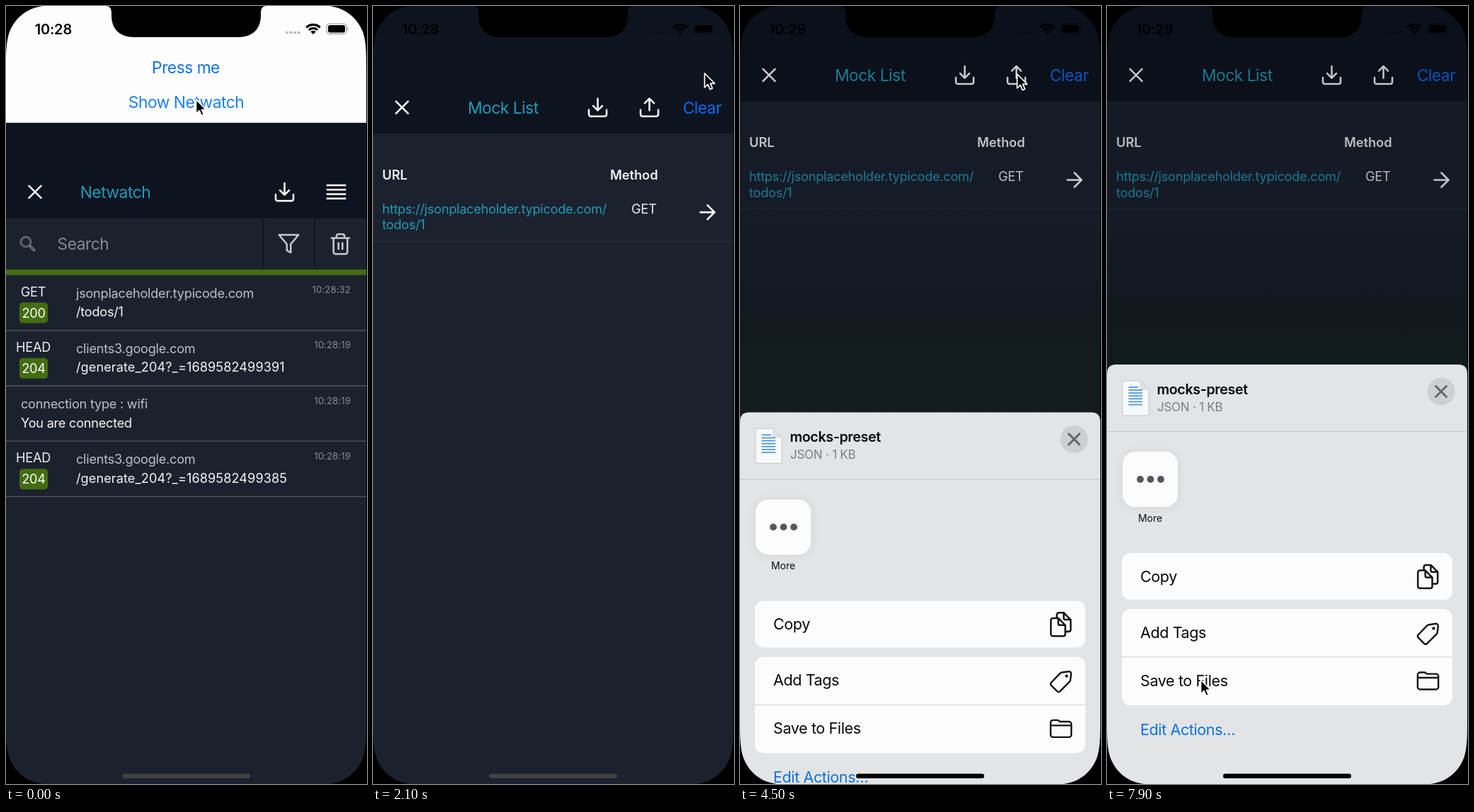
An HTML page for the animation above (8 s loop, 510 by 1098 pixels).

```html
<!DOCTYPE html>
<html lang="en">
<head>
<meta charset="utf-8">
<title>Network inspector</title>
<style>
  html, body { margin: 0; width: 100%; height: 100%; overflow: hidden; background: #000; }
  svg { display: block; width: 100vw; height: 100vh; }
  text { font-family: Inter, Roboto, sans-serif; white-space: pre; }
  .title { font-size: 22.8px; letter-spacing: -.5px; }
  .body { font-size: 18.2px; letter-spacing: -.27px; }
  .path { font-size: 18.2px; letter-spacing: .04px; }
  .head { font-size: 18.2px; font-weight: 600; }
  .time { font-size: 13.2px; letter-spacing: .1px; }
  .clock { font-size: 20px; font-weight: 600; letter-spacing: -.2px; }
  .action { font-size: 21.5px; letter-spacing: -.38px; }
  .file { font-size: 19.6px; font-weight: 600; letter-spacing: -.35px; }
  .meta { font-size: 17px; letter-spacing: -.25px; }
  .more { font-size: 14px; }
  .icon { fill: none; stroke-width: 1.8; stroke-linecap: round; stroke-linejoin: round; }
</style>
</head>
<body>
<svg id="stage" viewBox="0 0 510 1098" preserveAspectRatio="none"></svg>
<script>
const LOOP = 8000, STEP = 100, SCREEN_H = 1098, SHEET_TRAVEL = 600;
const CYAN = '#209bba', HEADER = '#0e141f', BODY = '#1b222e', GREEN = '#436d10', SOFT = '#bcc0c6';

const text = (x, y, cls, fill, str, anchor = 'start') =>
  `<text x="${x}" y="${y}" class="${cls}" fill="${fill}" text-anchor="${anchor}">${str}</text>`;
const rect = (x, y, w, h, fill, rx = 0) =>
  `<rect x="${x}" y="${y}" width="${w}" height="${h}" rx="${rx}" fill="${fill}"/>`;
const line = (x1, y1, x2, y2, color, width) =>
  `<path d="M${x1} ${y1}L${x2} ${y2}" stroke="${color}" stroke-width="${width}" fill="none"/>`;
const circle = (x, y, r, fill) => `<circle cx="${x}" cy="${y}" r="${r}" fill="${fill}"/>`;

// Icons are drawn on a 24-unit grid and centred on (x, y).
const SHAPES = {
  close: 'M5.8 5.8L18.2 18.2M18.2 5.8L5.8 18.2',
  download: 'M21 14.5V19a2 2 0 0 1-2 2H5a2 2 0 0 1-2-2v-4.5M7.3 10.3l4.7 4.7 4.7-4.7M12 15V3',
  upload: 'M21 14.5V19a2 2 0 0 1-2 2H5a2 2 0 0 1-2-2v-4.5M16.7 7.7L12 3 7.3 7.7M12 3v12',
  menu: 'M3 5.4h18M3 9.8h18M3 14.2h18M3 18.6h18',
  filter: 'M22 3H2l8 9.46V19l4 2v-8.54z',
  trash: 'M3 6h18M19 6v14a2 2 0 0 1-2 2H7a2 2 0 0 1-2-2V6M8 6V4a2 2 0 0 1 2-2h4a2 2 0 0 1 2 2v2M10 11v6M14 11v6',
  arrow: 'M5 12h14M12 5l7 7-7 7',
  copy: 'M8 6V2.5A2 2 0 0 1 10 .5H15L22 7.5V17.5A2 2 0 0 1 20 19.5H16.5M15 .5V6A1.5 1.5 0 0 0 16.5 7.5H22M4 6H9.5L16.5 13V22A2 2 0 0 1 14.5 24H4A2 2 0 0 1 2 22V8A2 2 0 0 1 4 6ZM9.5 6V11.5A1.5 1.5 0 0 0 11 13H16.5',
  tag: 'M13 2.5L20 1.5A2.4 2.4 0 0 1 22.6 4.2L21.8 10.5Q21.6 11.6 20.8 12.4L11 22.2Q9.5 23.5 8 22.2L1.8 16Q.5 14.5 1.8 13L11 3.5Q12 2.6 13 2.5ZM17.8 5.6a.7.7 0 1 0 .1 0',
  folder: 'M1 18.5V5.5A2.5 2.5 0 0 1 3.5 3H8Q9 3 9.8 3.8L10.8 4.6H20.5A2.5 2.5 0 0 1 23 7.1V18.5A2.5 2.5 0 0 1 20.5 21H3.5A2.5 2.5 0 0 1 1 18.5ZM1 8.6H23'
};
const icon = (name, x, y, scale, color = '#fff', id = '') =>
  `<path ${id && `id="${id}"`} class="icon" d="${SHAPES[name]}" stroke="${color}"
    transform="translate(${x} ${y}) scale(${scale}) translate(-12 -12)"/>`;

function requestRow(index, method, status, host, path, time) {
  const y = 214.7 + index * 78.2;
  const label = method
    ? text(38.5, y + 30, 'body', '#eceef0', method, 'middle') +
      rect(19, y + 39, 40, 29, GREEN, 4.5) +
      text(39, y + 60, 'body', '#fff', status, 'middle')
    : '';
  const x = method ? 99 : 21;
  return label + text(x, y + 32, 'body', SOFT, host) +
    text(x, y + 58.5, path.includes('_') ? 'path' : 'body', '#f4f5f6', path) +
    text(487, y + 25.5, 'time', '#878d95', time, 'end') +
    line(0, y + 78.2, 509, y + 78.2, '#515963', 1.3);
}

const panel = rect(0, 0, 510, 1110, BODY) + rect(0, 0, 510, 134.5, HEADER) + icon('close', 41, 97.5, 1.38);

const requests = panel +
  text(104.7, 106, 'title', CYAN, 'Netwatch') +
  icon('download', 393.5, 97.5, 1.39) + icon('menu', 466.5, 97.5, 1.42, '#fff', 'menuIcon') +
  line(363, 134, 363, 208, HEADER, 1.5) + line(436, 134, 436, 208, HEADER, 1.5) +
  `<circle cx="28" cy="168" r="7" fill="none" stroke="#606770" stroke-width="2.8"/>` +
  line(33, 173, 41, 181, '#606770', 4) +
  text(72.5, 179, 'title', '#848a93', 'Search') +
  icon('filter', 399.5, 170.5, 1.38, '#c6cacf') + icon('trash', 472.5, 171, 1.4, '#c6cacf') +
  rect(0, 207, 510, 7.8, GREEN) +
  requestRow(0, 'GET', '200', 'jsonplaceholder.typicode.com', '/todos/1', '10:28:32') +
  requestRow(1, 'HEAD', '204', 'clients3.google.com', '/generate_204?_=1689582499391', '10:28:19') +
  requestRow(2, '', '', 'connection type : wifi', 'You are connected', '10:28:19') +
  requestRow(3, 'HEAD', '204', 'clients3.google.com', '/generate_204?_=1689582499385', '10:28:19');

const mocks = panel +
  text(134, 106, 'title', CYAN, 'Mock List') +
  icon('download', 317.5, 97.5, 1.39) + icon('upload', 390.5, 97.5, 1.39, '#fff', 'uploadIcon') +
  text(437.7, 106, 'title', '#0d6af0', 'Clear') +
  text(13, 199, 'head', '#f2f3f5', 'URL') + text(335, 199, 'head', '#f2f3f5', 'Method') +
  text(13, 247, 'body', CYAN, 'https://jsonplaceholder.typicode.com/') +
  text(13, 269.5, 'body', CYAN, 'todos/1') +
  text(365, 247, 'body', '#eceef0', 'GET') +
  icon('arrow', 472.5, 245.5, 1.43) +
  line(0, 286.7, 509, 286.7, '#242e3a', 1.3);

const fileLines = [0, 1, 2, 3, 4, 5, 6].map(i =>
  line(30.5, 538 + i * 4.1, i ? 50 : 44, 538 + i * 4.1, '#3d8ede', 1.6)).join('');

const sheet =
  `<path d="M0 1110V519Q0 506 13 506H496Q509 506 509 519V1110Z" fill="#e2e4e5"/>` +
  `<path d="M22 529H47L59 541V578H22Z" fill="#f8f9fa" stroke="#c3c6c9"/>` +
  `<path d="M47 529V541H59Z" fill="#dfe2e4" stroke="#c9ccce" stroke-width=".8"/>` + fileLines +
  text(70.5, 548, 'file', '#050505', 'mocks-preset') +
  text(71, 572, 'meta', '#7c7e81', 'JSON · 1 KB') +
  circle(472, 544, 19.5, '#cdcfd0') +
  `<path d="M464.5 536.5l15 15M479.5 536.5l-15 15" stroke="#66686b" stroke-width="3" stroke-linecap="round"/>` +
  line(0, 600.5, 509, 600.5, '#c8cacc', 1.2) +
  `<g filter="url(#soft)">${rect(22, 629, 78, 78, '#fcfcfc', 18)}</g>` +
  [47, 61.5, 76].map(x => circle(x, 668, 4.9, '#54575c')).join('') +
  text(61, 728, 'more', '#101010', 'More', 'middle') +
  rect(21, 772, 467, 66, '#fcfcfc', 12) + rect(21, 851, 467, 136, '#fcfcfc', 12) +
  line(21, 918.7, 488, 918.7, '#d9dadb', 1.2) +
  text(47, 813, 'action', '#080808', 'Copy') +
  text(47, 892, 'action', '#080808', 'Add Tags') +
  text(47, 960, 'action', '#080808', 'Save to Files') +
  text(47, 1029, 'action', '#0d72dc', 'Edit Actions…') +
  icon('copy', 453.2, 805, 1.4, '#151515') + icon('tag', 453.5, 886, 1.35, '#151515') +
  icon('folder', 453.5, 952.5, 1.33, '#151515');

const arc = r => {
  const d = r * Math.SQRT1_2;
  return `<path d="M${434 - d} ${40 - d}A${r} ${r} 0 0 1 ${434 + d} ${40 - d}" fill="none" stroke="#000" stroke-width="3.2"/>`;
};
const statusBar =
  `<text id="clock" x="40.7" y="39.7" class="clock"></text>` +
  [397, 402.7, 408.4, 414].map(x => circle(x, 37.5, 2.1, 'rgba(0,0,0,.25)')).join('') +
  arc(13.6) + arc(8.6) + `<path d="M434 40l-3.7-3.7a5.2 5.2 0 0 1 7.4 0z"/>` +
  `<rect x="453" y="25" width="28" height="14.4" rx="4.3" fill="none" stroke="#000" stroke-opacity=".4" stroke-width="1.2"/>` +
  rect(455, 27, 24, 10.4, '#000', 2.6) +
  `<path d="M482.5 29.8q2.6 2.4 0 4.8z" opacity=".4"/>`;

// Continuous-curvature corner, in units of its radius.
const CORNER = 'M-.2 1.53H0C0 1.09 0 .87 .075 .63C.17 .37 .37 .17 .63 .075C.87 0 1.09 0 1.53 0V-.2H-.2Z';
const corner = (x, y, sx, sy) =>
  `<path d="${CORNER}" transform="translate(${x} ${y}) scale(${62 * sx} ${62 * sy})"/>`;
const bezel = rect(509, 0, 2, 1098, '#000') +
  corner(0, -1.7, 1, 1) + corner(509, -1.7, -1, 1) +
  corner(0, 1099.7, 1, -1) + corner(509, 1099.7, -1, -1) +
  `<path d="M141 0C147 0 149 4 149 10V13C149 33 161 44 181 44H328C348 44 360 33 360 13V10C360 4 362 0 368 0Z"/>`;

document.getElementById('stage').innerHTML = `
  <defs>
    <linearGradient id="shade" gradientUnits="userSpaceOnUse" x1="0" y1="290" x2="0" y2="510">
      <stop stop-color="#00030a" stop-opacity=".23"/><stop offset="1" stop-color="#0b1712" stop-opacity=".62"/>
    </linearGradient>
    <filter id="soft" x="-30%" y="-30%" width="160%" height="160%">
      <feDropShadow dx="0" dy="1" stdDeviation="7" flood-opacity=".07"/>
    </filter>
  </defs>
  ${rect(0, 0, 510, 1098, '#fdfdfd')}
  ${text(254, 94.5, 'title', '#1473e6', 'Press me', 'middle')}
  ${text(254.5, 143.7, 'title', '#2080ea', 'Show Netwatch', 'middle')}
  <g id="requests">${requests}</g>
  <g id="mocks">${mocks}</g>
  <rect id="dim" width="510" height="1098" fill="url(#shade)"/>
  ${statusBar}
  <g id="sheet">${sheet}</g>
  <rect id="homeBar" x="164" y="1083.5" width="181" height="6.5" rx="3.2"/>
  ${bezel}
  <path id="cursor" d="M0 0V20L4.6 15.7 7.6 22.6 11 21.2 8.1 14.4H14.2Z" stroke="#fff" stroke-width="1.7" stroke-linejoin="round"/>`;

const el = {};
document.querySelectorAll('#stage [id]').forEach(node => { el[node.id] = node; });

const CURSOR = [
  [0, 268.5, 132], [800, 268.5, 132], [1200, 441, 147], [1500, 468.5, 95], [2800, 468.5, 95],
  [3400, 391.5, 96], [4800, 391.5, 96], [5100, 223.5, 536], [5500, 132.5, 951], [LOOP, 132.5, 951]
];

// Critically damped spring: the share of travel still to go.
function remaining(t, start) {
  const x = Math.max(0, t - start) * 0.01826;
  return (1 + x) * Math.exp(-x);
}

function cursorAt(t) {
  const i = CURSOR.findIndex(key => key[0] > t);
  const [t0, x0, y0] = CURSOR[i - 1], [t1, x1, y1] = CURSOR[i];
  const p = (t - t0) / (t1 - t0);
  return [x0 + (x1 - x0) * p, y0 + (y1 - y0) * p];
}

function pressOpacity(t, down, up) {
  if (t < down) return 1;
  return t <= up ? 0.2 : Math.min(1, 0.2 + 0.8 * (t - up) / 200);
}

const move = (node, x, y) => node.setAttribute('transform', `translate(${x.toFixed(2)} ${y.toFixed(2)})`);

function render(t) {
  const sheetLeft = remaining(t, 4295);
  move(el.requests, 0, SCREEN_H * remaining(t, -184.6));
  move(el.mocks, 0, SCREEN_H * remaining(t, 1828));
  move(el.sheet, 0, SHEET_TRAVEL * sheetLeft);
  move(el.cursor, ...cursorAt(t));
  el.dim.setAttribute('opacity', 1 - sheetLeft);
  el.menuIcon.setAttribute('opacity', pressOpacity(t, 1700, 1800));
  el.uploadIcon.setAttribute('opacity', pressOpacity(t, 4200, 4300));
  el.homeBar.setAttribute('fill', t < 4400 ? '#414143' : '#000');
  el.clock.textContent = t < 3000 ? '10:28' : '10:29';
}

const start = performance.now();
function tick() {
  const t = (performance.now() - start) % LOOP;
  render(Math.floor(t / STEP) * STEP);
  requestAnimationFrame(tick);
}
tick();
</script>
</body>
</html>
```
